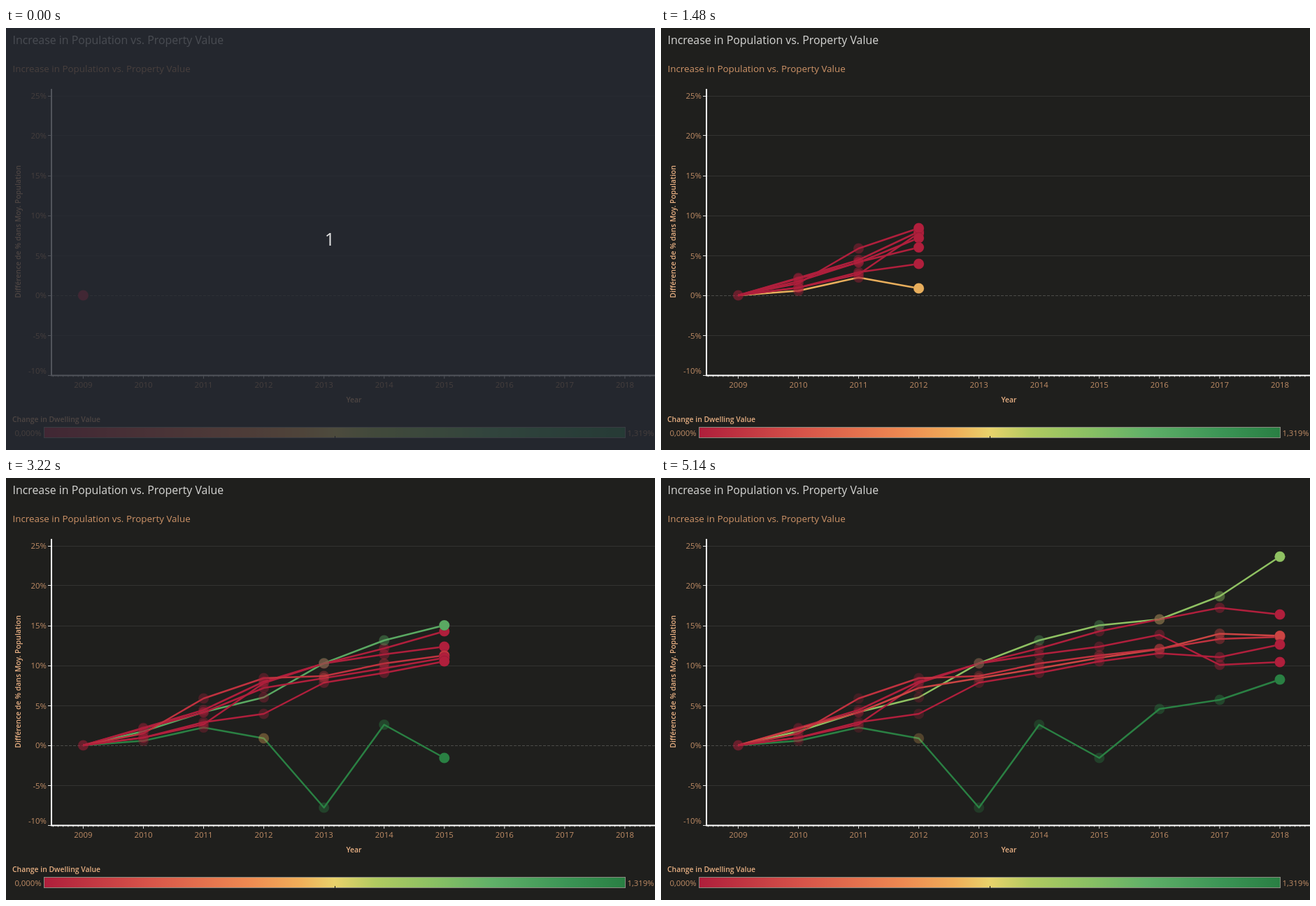
An HTML page that plays this animation: 928 px wide and 603 px high, repeating every 5.4 s.

```html
<!DOCTYPE html>
<html lang="en">
<head>
<meta charset="utf-8">
<title>Population vs. Property Value</title>
<style>
  html, body { margin: 0; width: 100%; height: 100%; overflow: hidden; background: #1f1f1d; }
  svg { display: block; width: 928px; height: 603px; font-family: "Open Sans", "Noto Sans", sans-serif; }
  .title { font-size: 15.9px; fill: #d6d6d4; }
  .subtitle { font-size: 13.4px; fill: #cf9468; }
  .label { font-size: 11.4px; fill: #c08d66; }
  .heading { font-size: 10.4px; font-weight: 600; fill: #e9b184; }
  .mid { text-anchor: middle; }
  .end { text-anchor: end; }
  .grid { stroke: #333331; }
  .zero { stroke: #4b4b48; stroke-dasharray: 4 2; }
  .axis { stroke: #fff; stroke-width: 2; }
  .tick { stroke: #e4e4e2; }
  .trend { fill: none; stroke-width: 2.5; stroke-linejoin: round; }
  .count { font-size: 25px; fill: #e6e6e6; text-anchor: middle; }
</style>
</head>
<body>
<svg viewBox="0 0 928 603">
  <defs><linearGradient id="scale"></linearGradient></defs>
  <rect width="928" height="603" fill="#1f1f1d"/>
  <text class="title" x="9.5" y="22.5">Increase in Population vs. Property Value</text>
  <text class="subtitle" x="9.5" y="62.5">Increase in Population vs. Property Value</text>
  <g id="axes"></g>
  <text class="heading mid" transform="translate(21 291) rotate(-90)">Différence de % dans Moy. Population</text>
  <text class="heading mid" x="497.5" y="535">Year</text>
  <text class="heading" x="9" y="562.5">Change in Dwelling Value</text>
  <text class="label" x="12.5" y="582.5">0,000%</text>
  <text class="label" x="888.5" y="582.5">1,319%</text>
  <rect x="54.5" y="570.5" width="831" height="15" fill="url(#scale)" stroke="#8a8a80"/>
  <path d="M470.5 583v3" stroke="#111"/>
  <g id="plot"></g>
  <g id="countdown">
    <rect width="928" height="603" fill="#262a33" fill-opacity=".8"/>
    <text class="count" x="463" y="310.5">1</text>
  </g>
</svg>
<script>
const LOOP = 5400;
const COUNTDOWN_END = 80;
const YEAR_STARTS = [0, 600, 900, 1480, 2120, 2920, 3220, 3660, 4580, 4980];
const RED = '#b01f3c', CRIMSON = '#c0323f', CORAL = '#cb4443';
const GREEN = '#2a8043', MEDIUM = '#5aa962', LIGHT = '#8fc162', AMBER = '#e8ae5c';

// y: height per year; tint: colours that differ from red, by year index
const SERIES = [
  { y: [382, 375.5, 356.5, 372, 471, 352.5, 400, 330, 317, 288],
    tint: { 3: AMBER, 4: GREEN, 5: GREEN, 6: GREEN, 7: GREEN, 8: GREEN, 9: GREEN } },
  { y: [382, 362, 334.5, 313.5, 264.7, 232, 210.5, 202, 169, 112.3],
    tint: { 4: MEDIUM, 5: MEDIUM, 6: MEDIUM, 7: LIGHT, 8: LIGHT, 9: LIGHT } },
  { y: [382, 357, 331.5, 291, 265, 243.5, 219, 202, 185.5, 195], tint: {} },
  { y: [382, 371, 352, 293, 265, 252, 241, 224, 267, 263], tint: {} },
  { y: [382, 358, 335, 300, 286, 272, 257, 244.5, 222.5, 225.5],
    tint: { 4: CORAL, 7: CORAL, 8: CORAL, 9: CORAL } },
  { y: [382, 365, 315, 286, 283, 265, 253.5, 244, 230, 227],
    tint: { 4: CRIMSON, 5: CRIMSON, 6: CRIMSON, 7: CRIMSON, 8: CRIMSON, 9: CRIMSON } },
  { y: [382, 371, 349, 337, 292.5, 278.5, 262, 250.5, 256, 238], tint: {} }
];
// Marks stack differently from lines: greens end up in front
const MARK_ORDER = [2, 3, 5, 4, 6, 0, 1].map(i => SERIES[i]);

const $ = id => document.getElementById(id);
const yearX = i => 110.4 + i * 86.06;
const colorAt = (series, i) => series.tint[i] || RED;
const line = (cls, x1, y1, x2, y2) =>
  `<line class="${cls}" x1="${x1}" y1="${y1}" x2="${x2}" y2="${y2}"/>`;
const label = (cls, x, y, text) =>
  `<text class="label ${cls}" x="${x}" y="${y}">${text}</text>`;

function drawAxes() {
  let out = '';
  [97, 153.5, 211, 268, 325.5, 382, 439.5, 496.5].forEach((y, i) => {
    const value = 25 - i * 5;
    const lineY = Math.floor(y) + .5;
    if (value > -10) out += line(value ? 'grid' : 'zero', 66, lineY, 928, lineY);
    out += line('tick', 60, lineY, 65, lineY);
    out += label('end', 58, (value > -10 ? y : 489.5) + 4.2, value + '%');
  });
  for (let m = -6; m <= 113; m++) {
    const x = yearX(m / 12);
    out += line('tick', x, 497, x, m % 12 ? 498.5 : 501);
  }
  for (let i = 0; i < 10; i++) out += label('mid', yearX(i), 514, 2009 + i);
  out += line('axis', 65, 87, 65, 497) + line('axis', 64, 496.5, 928, 496.5);
  $('axes').innerHTML = out;
}

function drawScale() {
  const stops = [[0, '#ae1e3b'], [18, '#d75449'], [35, '#ee8951'], [44, '#f0ae59'],
    [50, '#e9d26b'], [57, '#b1ca60'], [67, '#8ac063'], [77, '#60b068'],
    [90, '#3b9455'], [100, '#297f43']];
  $('scale').innerHTML = stops
    .map(([at, color]) => `<stop offset="${at}%" stop-color="${color}"/>`).join('');
}

function mark(series, i, year) {
  const age = year - i;
  const alpha = !age ? 1 : i ? Math.max(.2, .43 - .03 * age) : .5;
  return `<circle cx="${yearX(i)}" cy="${series.y[i]}" r="7.6" ` +
    `fill="${colorAt(series, i)}" opacity="${alpha}" ` +
    'stroke="#1f1f1d" stroke-opacity=".25" stroke-width=".6"/>';
}

function drawPlot(year) {
  let out = '';
  if (year) for (const s of SERIES) {
    const points = s.y.slice(0, year + 1).map((y, i) => `${yearX(i)},${y}`).join(' ');
    out += `<polyline class="trend" points="${points}" stroke="${colorAt(s, year)}"/>`;
  }
  // All series share the first point, so it needs one mark only
  out += mark(SERIES[0], 0, year);
  for (let i = 1; i <= year; i++) {
    for (const s of MARK_ORDER) out += mark(s, i, year);
  }
  $('plot').innerHTML = out;
}

let shownYear = -1;
function tick() {
  const t = performance.now() % LOOP;
  const year = YEAR_STARTS.filter(start => start <= t).length - 1;
  if (year !== shownYear) drawPlot(shownYear = year);
  $('countdown').style.display = t < COUNTDOWN_END ? '' : 'none';
  requestAnimationFrame(tick);
}

drawAxes();
drawScale();
tick();
</script>
</body>
</html>
```
